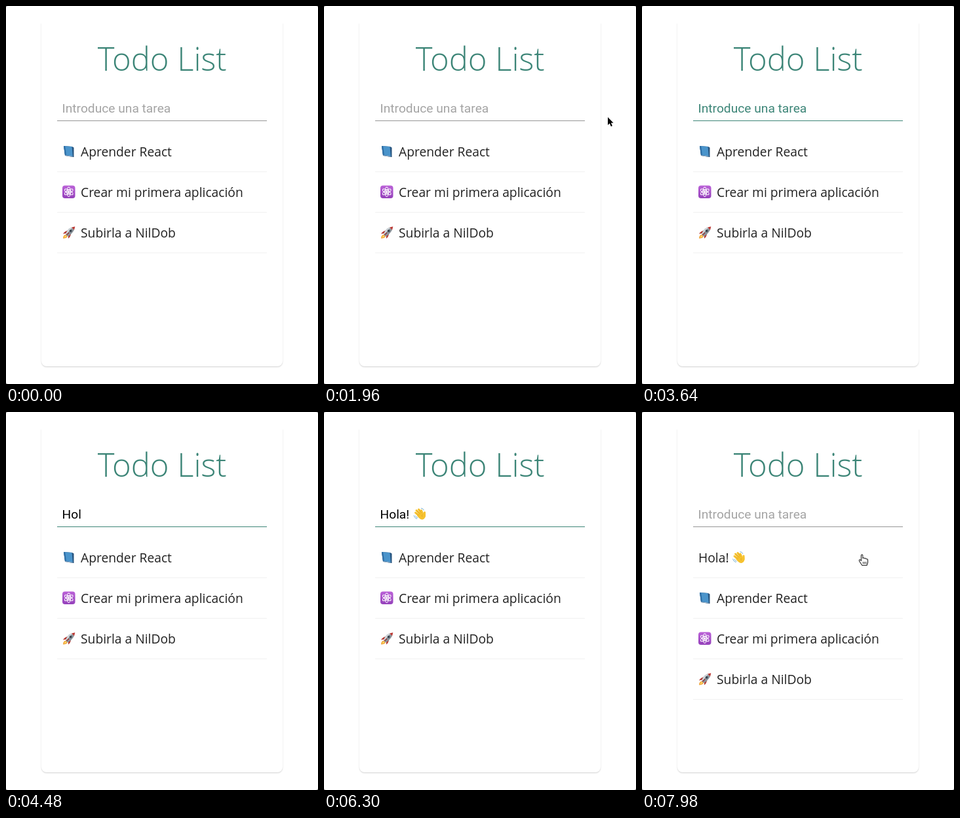
Write an HTML page that moves like this. It is 476x578 px and loops after 8 s.

```html
<!DOCTYPE html>
<html lang="es">
<head>
<meta charset="utf-8">
<title>Todo List</title>
<style>
  html, body { margin: 0; width: 100%; height: 100%; overflow: hidden; background: #8a8a8a; }
  #stage { position: relative; width: 476px; height: 578px; border-radius: 3px; background: #fff; overflow: hidden; }
  #clip { position: absolute; inset: 27px 0 0; overflow: hidden; }
  #card { position: absolute; left: 54px; top: -12px; width: 368px; height: 536px; border-radius: 8px;
    box-shadow: 0 1px 2px rgba(0, 0, 0, .19); }
  svg { position: absolute; left: 0; top: 0; }
  text { font: 19.25px "Open Sans", sans-serif; fill: #222; white-space: pre; }
  #title { font-size: 49px; font-weight: 300; fill: #3c8577; text-anchor: middle; }
  #field { font-family: Roboto, sans-serif; font-size: 19.2px; }
</style>
</head>
<body>
<div id="stage">
  <div id="clip"><div id="card"></div></div>
  <svg width="476" height="578">
    <defs>
      <linearGradient id="violet" x2="0" y2="1">
        <stop stop-color="#bb62d8"/><stop offset="1" stop-color="#9440ba"/>
      </linearGradient>
      <g id="book">
        <path d="M2 1.5 15 2.5 17.5 4V18.5L15.5 18.5 4 16.5Z" fill="#28557f"/>
        <path d="M4 15.8 15.8 17.2V18L4.5 16.6Z" fill="#e4e9ee"/>
        <path d="M2 1.5 14.5 2.5 15.8 17.2 4 15.5Z" fill="#4a94cb"/>
        <path d="M2 1.5 4.3 1.7 6 15.8 4 15.5Z" fill="#2f6fa6"/>
      </g>
      <g id="atom">
        <rect width="19.5" height="19.5" rx="4" fill="url(#violet)"/>
        <g fill="none" stroke="#fff" stroke-width="1.1" transform="translate(9.75 9.75)">
          <ellipse rx="2.8" ry="7.2"/>
          <ellipse rx="2.8" ry="7.2" transform="rotate(60)"/>
          <ellipse rx="2.8" ry="7.2" transform="rotate(-60)"/>
          <circle r="1.2" fill="#fff"/>
        </g>
      </g>
      <g id="rocket">
        <path d="M1 19Q1 14 5 13L8 16Q6 19 1 19" fill="#f0a53a"/>
        <path d="M2.5 17.5Q3 15 5.5 14.5L6.5 15.5Q5 17.5 2.5 17.5" fill="#ffe16a"/>
        <path d="M9 7Q4 7 1 12L6 11ZM13 11Q13 16 9 19L9 14Z" fill="#b53a34"/>
        <path d="M5 13Q7 5 14 2L18 6Q14 13 8 16Z" fill="#8b949b"/>
        <path d="M5 13Q7 5 14 2L15 3Q9 8 6.5 14.5Z" fill="#cfd6da"/>
        <path d="M14 2 19.3.7 18 6Q16 3.5 14 2" fill="#b8322d"/>
        <circle cx="12.7" cy="7.3" r="1.9" fill="#35414c"/>
        <path d="M6 13.8 10 10" stroke="#8a3030" stroke-width="1.4"/>
      </g>
      <g id="wave">
        <g fill="none" stroke="#f6c22f" stroke-width="3" stroke-linecap="round">
          <path d="M3.5 8 9 13M5 4.5 11 11M8.5 3 13 9M12.5 4.5 15 10"/>
          <path d="M17.5 7.5V13"/>
        </g>
        <path d="M6 11 13 6 16.5 10.5 18.8 9Q20 17 14.5 18.5 11 19 6 13Z" fill="#f6c22f"/>
        <path d="M4.5 8 9 12M6 5 11 10M9.5 3.7 13 8.5M14.5 10.5Q12.5 12 14 14.5" fill="none" stroke="#d99a1d" stroke-width=".6"/>
        <path d="M1 12Q2 16 6 17.5M3.5 12.5Q4.5 15 7 16M12 1.2Q15 1 16.5 4.5" fill="none" stroke="#6aa9cf" stroke-width=".9"/>
      </g>
      <path id="arrow" d="M0 0V12L2.8 9.4 4.9 14.2 6.9 13.3 4.9 8.7H8.5Z" stroke="#fff" paint-order="stroke" stroke-width="1.4"/>
      <path id="beam" d="M-3.5-7.5Q0-7.5 0-5.5 0-7.5 3.5-7.5M0-6V6M-3.5 7.5Q0 7.5 0 5.5 0 7.5 3.5 7.5M-1.7 2.5H1.7" fill="none" stroke="#222" stroke-width="1.3"/>
      <g id="hand" stroke="#222" stroke-width="1.1" stroke-linejoin="round">
        <path d="M-3.6 1.5V-6.5Q-3.6-8-2.4-8T-1.2-6.5V-2.6Q1-3.6 1.4-2 3.6-2.8 4-1.2 6.5-1.6 6.5.6V4L5 8.5H-2.2L-6.5 2Q-7.2.5-6-.2-5-.5-3.6 1.5Z" fill="#fff"/>
        <path d="M-.6 3V6.5M1.6 3V6.5M3.8 3V6.5" fill="none" stroke-width=".9"/>
      </g>
    </defs>
    <text id="title" x="238.2" y="98.5">Todo List</text>
    <text id="field" x="85.5" y="163"></text>
    <use id="typedWave" href="#wave" x="136" y="146"/>
    <path id="line" d="M78 175.5H398"/>
    <g id="hello">
      <text x="86" y="230">Hola!</text>
      <use href="#wave" x="137.5" y="212.5"/>
      <path d="M78 253.5H398" stroke="#f1f1f1"/>
    </g>
    <g id="list"></g>
    <use id="cursor"/>
  </svg>
</div>
<script>
const $ = id => document.getElementById(id);
const set = (id, attrs) => { for (const k in attrs) $(id).setAttribute(k, attrs[k]); };
const show = (id, on) => set(id, { visibility: on ? 'visible' : 'hidden' });

const LOOP = 8000, STEP = 70;
const GREEN = '#3c8577', GREY = '#a4a4a4';
const FOCUS = 2870, SUBMIT = 6370, BLUR = 7700;
const keys = [4060, 4270, 4410, 4620, 4900];  // one time per letter
const WAVE = 5950;

// Cursor routes as [time, x, y]
const routes = [
  [[1750, 451, 196], [1960, 433, 170], [2170, 409, 161], [2450, 362, 157], [2660, 341, 157], [3430, 338, 157]],
  [[6790, 338, 157], [7000, 345, 170], [7350, 339, 222], [7560, 338, 226], [LOOP, 338, 226]]
];

$('list').innerHTML = [['book', 'Aprender React'], ['atom', 'Crear mi primera aplicación'], ['rocket', 'Subirla a NilDob']]
  .map(([icon, label], i) => `<g transform="translate(0 ${62 * i})">
    <use href="#${icon}" x="86" y="212.5"/><text x="114" y="230">${label}</text>
    <path d="M78 253.5H398" stroke="#f1f1f1"/></g>`).join('');

function locate(t) {
  const route = routes.find(r => t >= r[0][0] && t < r[r.length - 1][0]);
  if (!route) return null;
  const i = route.findIndex(p => p[0] > t);
  const [t0, x0, y0] = route[i - 1], [t1, x1, y1] = route[i];
  const u = (t - t0) / (t1 - t0);
  return [x0 + (x1 - x0) * u, y0 + (y1 - y0) * u];
}

function draw(t) {
  const focused = t >= FOCUS && t < BLUR;
  const added = t >= SUBMIT;
  const typed = added ? '' : 'Hola!'.slice(0, keys.filter(k => t >= k).length);

  $('field').textContent = typed || 'Introduce una tarea';
  $('field').style.fill = typed ? '#000' : focused ? GREEN : GREY;
  set('line', { stroke: focused ? GREEN : '#959595' });
  show('typedWave', t >= WAVE && !added);
  show('hello', added);
  set('list', { transform: `translate(0 ${added ? 62 : 0})` });

  const pos = locate(t);
  show('cursor', pos);
  if (pos) {
    const [x, y] = pos;
    const shape = x > 398 ? 'arrow' : y < 177 ? 'beam' : y > 192 ? 'hand' : 'arrow';
    set('cursor', { href: '#' + shape, x, y });
  }
}

function tick(now) {
  const t = now % LOOP;
  draw(t - t % STEP);
  requestAnimationFrame(tick);
}
draw(0);
requestAnimationFrame(tick);
</script>
</body>
</html>
```
